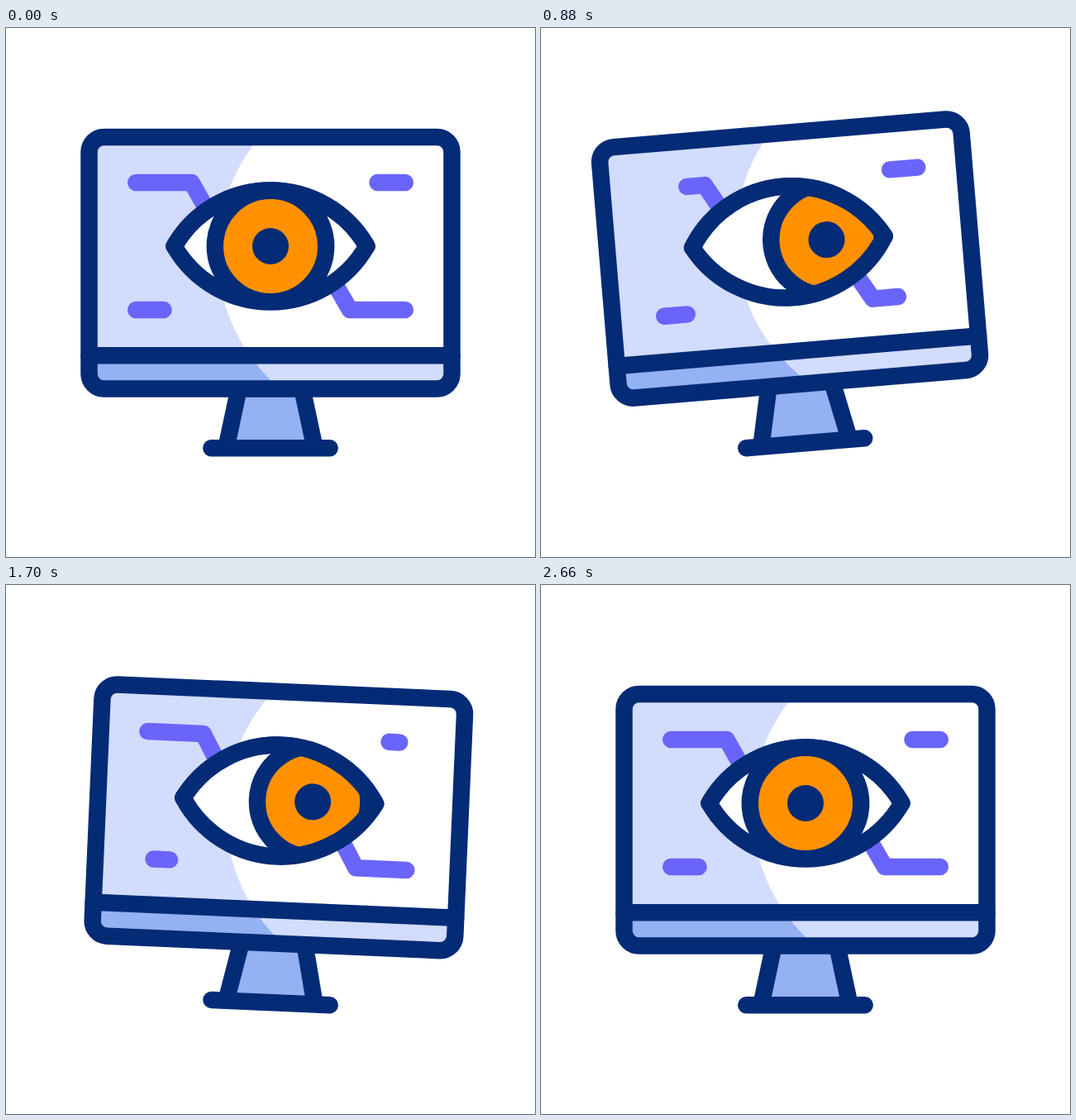
Recreate the animation shown at these times as an HTML page. Size 640x640 px, loop 3.6 s.

```html
<!DOCTYPE html>
<html lang="en">
<head>
<meta charset="utf-8">
<title>Watching monitor</title>
<style>
  html, body { margin: 0; width: 100%; height: 100%; overflow: hidden; background: #fff; }
  svg { display: block; width: 100vw; height: 100vh; }
  .line { fill: none; stroke: #042b76; stroke-width: 20.5; stroke-linecap: round; stroke-linejoin: round; }
  .trace { fill: none; stroke: #6a65fa; stroke-width: 20.5; stroke-linecap: round; stroke-linejoin: round; }
</style>
</head>
<body>
<svg viewBox="0 0 640 640">
  <defs>
    <clipPath id="case"><rect x="100.5" y="132" width="439" height="304.5" rx="18"/></clipPath>
    <clipPath id="almond"><path d="M-116.5 0A134.3 134.3 0 0 1 116.5 0A134.3 134.3 0 0 1 -116.5 0Z"/></clipPath>
  </defs>
  <g id="monitor">
    <path d="M281.5 437L266.4 508H373.6L358.5 437Z" fill="#94b1f3"/>
    <path class="line" style="stroke-linecap:butt" d="M281.5 437L266.4 508M358.5 437L373.6 508"/>
    <path class="line" d="M248.3 508.2H391.7"/>
    <g clip-path="url(#case)">
      <path d="M100 132H540V396H100Z" fill="#d2dcfd"/>
      <path d="M100 396H540V437H100Z" fill="#94b1f3"/>
      <clipPath id="top"><path d="M100 132H540V396H100Z"/></clipPath>
      <circle cx="471.6" cy="272" r="216" fill="#d2dcfd"/>
      <circle cx="471.6" cy="272" r="216" fill="#fff" clip-path="url(#top)"/>
      <path d="M471 132H540V396H471Z" fill="#fff"/>
      <path d="M471 396H540V437H471Z" fill="#d2dcfd"/>
    </g>
    <path class="line" d="M100.5 396.3H539.5"/>
    <rect class="line" x="100.5" y="132" width="439" height="304.5" rx="18"/>
    <path class="trace" id="tl"/>
    <path class="trace" id="br"/>
    <path class="trace" id="bl"/>
    <path class="trace" id="tr"/>
    <g id="eye">
      <path d="M-116.5 0A134.3 134.3 0 0 1 116.5 0A134.3 134.3 0 0 1 -116.5 0Z" fill="#fff"/>
      <g clip-path="url(#almond)">
        <g id="iris">
          <circle r="67.2" fill="#ff9100" stroke="#042b76" stroke-width="20.5"/>
          <circle r="22" fill="#042b76"/>
        </g>
      </g>
      <path class="line" id="lid" style="fill:#fff"/>
      <path class="line" d="M-116.5 0A134.3 134.3 0 0 1 116.5 0A134.3 134.3 0 0 1 -116.5 0Z"/>
    </g>
  </g>
</svg>
<script>
const LOOP = 3600, HALF = 116.5, SAG = 67.5;
const el = id => document.getElementById(id);
const smooth = p => (1 - Math.cos(Math.PI * p)) / 2;

// Gentle start, longer settle: cubic-bezier(.35, 0, .45, 1)
function settle(p) {
  let lo = 0, hi = 1;
  for (let i = 0; i < 20; i++) {
    const u = (lo + hi) / 2, v = 1 - u;
    if (1.05 * v * v * u + 1.35 * v * u * u + u * u * u < p) lo = u; else hi = u;
  }
  return lo * lo * (3 - 2 * lo);
}

// Steps are [time, value]
const TILT = [[0, 0], [600, -5], [800, -5], [1533, 2.5], [1733, 2.5], [2200, -1], [2250, -1], [2660, 0]];
const ROLL = [[0, 0], [500, -10], [1067, 5], [1467, -2.5], [1830, 0]];
const GAZE = [[110, 0], [1210, 52.4], [1400, 52.4], [2500, 0]];
const BLINK = [[387, 0], [627, 1], [867, 0], [1772, 0], [2012, 1], [2252, 0]];
const dip = (start, size) => [[start, 0], [start + 800, size], [start + 1600, 0]];
const TRIM = { tl: dip(0, 47), br: dip(290, 43), bl: dip(600, 20), tr: dip(890, 20.5) };

function at(steps, t, ease = smooth) {
  if (t <= steps[0][0]) return steps[0][1];
  for (let i = 1; i < steps.length; i++) {
    const [t0, a] = steps[i - 1], [t1, b] = steps[i];
    if (t < t1) return a + (b - a) * ease((t - t0) / (t1 - t0));
  }
  return steps[steps.length - 1][1];
}

function lidPath(sag) {
  const s = Math.abs(sag) < 0.05 ? 0.05 : sag;
  const r = (HALF * HALF + s * s) / (2 * Math.abs(s));
  return `M${-HALF} 0A134.3 134.3 0 0 1 ${HALF} 0A${r} ${r} 0 0 ${s > 0 ? 1 : 0} ${-HALF} 0Z`;
}

function draw(t) {
  const tilt = at(TILT, t);
  // The stand rocks on whichever end of its foot touches the ground
  el('monitor').setAttribute('transform', `rotate(${tilt} ${tilt < 0 ? 248.3 : 391.7} 508.2)`);
  el('eye').setAttribute('transform', `translate(320 264) rotate(${at(ROLL, t)})`);
  el('iris').setAttribute('transform', `translate(${at(GAZE, t, settle)} 0)`);
  el('lid').setAttribute('d', lidPath(SAG * (2 * at(BLINK, t) - 1)));

  const cut = id => at(TRIM[id], t);
  el('tl').setAttribute('d', `M${157.2 + cut('tl')} 187H224.5L246 225`);
  el('br').setAttribute('d', `M${482.8 - cut('br')} 341H416L394 303`);
  el('bl').setAttribute('d', `M${157.2 + cut('bl')} 341H190.5`);
  el('tr').setAttribute('d', `M449.5 187H${482.8 - cut('tr')}`);
}

const begin = performance.now();
function tick() {
  draw((performance.now() - begin) % LOOP);
  requestAnimationFrame(tick);
}
tick();
</script>
</body>
</html>
```
